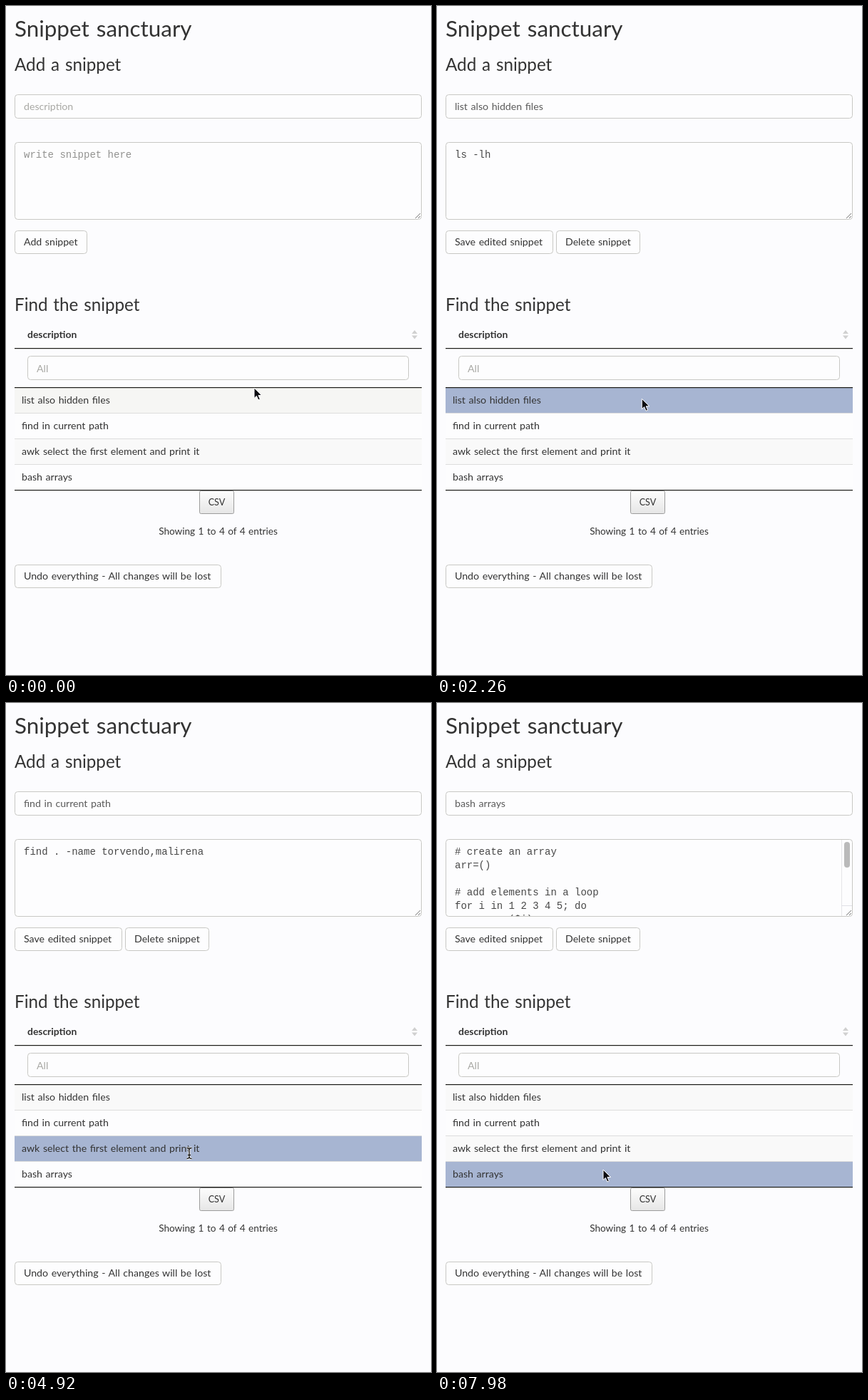
An HTML page for the animation above (8000 ms loop, 596 px wide and 939 px high).

```html
<!DOCTYPE html>
<html lang="en">
<head>
<meta charset="utf-8">
<title>Snippet sanctuary</title>
<style>
  html, body { margin: 0; width: 100%; height: 100%; overflow: hidden; background: #fcfcfe; }
  svg { display: block; }
  text { font: 14.15px Lato, sans-serif; word-spacing: .07em; fill: #333; white-space: pre; }
  .title { font-size: 31.4px; }
  .heading { font-size: 24.2px; }
  .strong { font-size: 13.9px; font-weight: bold; }
  .small { font-size: 12.6px; }
  .status { font-size: 13.6px; }
  .middle { text-anchor: middle; }
  .value { fill: #5a5a5a; }
  .hint { fill: #a8a8a4; }
  .code { font: 14px "Liberation Mono", monospace; word-spacing: 0; fill: #484848; }
  .code.hint { fill: #929290; }
  .box { fill: #fdfdfe; stroke: #c8c8c4; }
  .rule { fill: #1b1b18; }
</style>
</head>
<body>
<svg id="stage" width="596" height="939" viewBox="0 0 596 939">
  <defs>
    <linearGradient id="raised" x2="0" y2="1">
      <stop stop-color="#fdfdfd"/><stop offset="1" stop-color="#e6e6e6"/>
    </linearGradient>
    <clipPath id="editorClip"><rect x="13" y="192" width="569" height="107"/></clipPath>
    <path id="beamShape" d="M-3.5 -7.5Q0 -7.5 0 -5V5Q0 7.5 -3.5 7.5M3.5 -7.5Q0 -7.5 0 -5V5Q0 7.5 3.5 7.5M-2 2.5H2"/>
  </defs>
  <g id="page"></g>
  <g id="form"></g>
  <g id="table"></g>
  <g id="arrow">
    <path d="M0 0V14.5L3.4 11.4L5.8 17L8.3 15.9L5.9 10.5H10.5Z" fill="#0b0b10" stroke="#fff" stroke-linejoin="round"/>
  </g>
  <g id="beam" fill="none">
    <use href="#beamShape" stroke="#fff" stroke-width="3"/>
    <use href="#beamShape" stroke="#111" stroke-width="1.3"/>
  </g>
</svg>
<script>
const LOOP = 8000;
const ROW_TOP = 536, ROW_HEIGHT = 36;
const COLORS = { selected: "#a7b5d2", hovered: "#f6f6f4", striped: "#f9f9f9", plain: "#fdfdfe" };

const snippets = [
  { name: "list also hidden files", code: "ls -lh" },
  { name: "find in current path", code: "find . -name torvendo,malirena" },
  { name: "awk select the first element and print it", code: "ls | awk -F/ '{print $1}'" },
  { name: "bash arrays", code: "# create an array\narr=()\n\n# add elements in a loop\nfor i in 1 2 3 4 5; do\n    arr+=($i);" },
];

// A click highlights a row at once; the form follows a little later.
const clicks = [
  { select: 900, load: 1150 },
  { select: 3450, load: 3750 },
  { select: 4760, load: 5080 },
  { select: 6860, load: 7120 },
];

// Pointer stops: time, x, y
const pointerPath = [
  [0, 348, 536], [650, 288, 550], [2200, 288, 550], [2800, 262, 595],
  [3900, 262, 595], [4300, 257, 632], [5250, 257, 632], [5720, 233, 655],
];

const byId = id => document.getElementById(id);
const escapeText = s => s.replace(/&/g, "&amp;").replace(/</g, "&lt;");
const label = (x, y, s, cls = "") => `<text x="${x}" y="${y}" class="${cls}">${escapeText(s)}</text>`;
const box = (x, y, w, h) => `<rect class="box" x="${x + .5}" y="${y + .5}" width="${w - 1}" height="${h - 1}" rx="4"/>`;
const bar = (x, y, w, h, fill) => `<rect x="${x}" y="${y}" width="${w}" height="${h}" fill="${fill}"/>`;
const rule = y => `<rect class="rule" x="12" y="${y}" width="571" height="1.2"/>`;
const button = (x, y, w, s) => box(x, y, w, 33) + label(x + 13, y + 21, s);

function drawPage() {
  byId("page").innerHTML =
    label(12, 43, "Snippet sanctuary", "title") +
    label(12, 91, "Add a snippet", "heading") +
    label(12, 428, "Find the snippet", "heading") +
    label(30, 466, "description", "strong") +
    `<path d="M569 460L573 455L577 460ZM569 462.5L573 467.5L577 462.5Z" fill="#d0d0d0"/>` +
    rule(480) + box(30, 491, 535, 34) + label(43, 513.5, "All", "hint") +
    `<rect x="271.5" y="680.5" width="48" height="32" rx="2" fill="url(#raised)" stroke="#9c9c9c"/>` +
    label(295.5, 701, "CSV", "small middle") +
    label(297.5, 742, "Showing 1 to 4 of 4 entries", "status middle") +
    button(12, 784, 290, "Undo everything - All changes will be lost");
}

function drawForm(index) {
  const snippet = snippets[index];
  const lines = snippet ? snippet.code.split("\n") : ["write snippet here"];
  const scrollbar = lines.length > 5
    ? bar(567, 192, 1, 107, "#e6e6e8") + bar(567, 284, 15, 1, "#e0e0e6") +
      `<rect x="571" y="195" width="8" height="36" rx="4" fill="#bababa"/>`
    : "";
  byId("form").innerHTML =
    box(12, 124, 571, 34) +
    label(25, 145.5, snippet ? snippet.name : "description", snippet ? "value" : "hint") +
    box(12, 191, 571, 109) +
    `<g clip-path="url(#editorClip)">` +
    lines.map((line, i) => label(25, 212.5 + 19 * i, line, snippet ? "code" : "code hint")).join("") +
    scrollbar + `</g><path d="M574 298L581 291M578 298L581 295" stroke="#777"/>` +
    (snippet
      ? button(12, 315, 151, "Save edited snippet") + button(167, 315, 118, "Delete snippet")
      : button(12, 315, 102, "Add snippet"));
}

function drawTable(selected, hovered) {
  byId("table").innerHTML = snippets.map(({ name }, i) => {
    const y = ROW_TOP + ROW_HEIGHT * i;
    const look = i === selected ? "selected" : i === hovered ? "hovered" : i % 2 ? "plain" : "striped";
    return bar(12, y, 571, ROW_HEIGHT, COLORS[look]) +
      (i ? bar(12, y - 1, 571, 1, "#ddd") : "") + label(22, y + 22, name);
  }).join("") + rule(535) + rule(679);
}

function pointerAt(time) {
  const next = pointerPath.findIndex(stop => stop[0] > time);
  if (next < 0) return pointerPath.at(-1).slice(1);
  const [t0, x0, y0] = pointerPath[next - 1], [t1, x1, y1] = pointerPath[next];
  const u = (time - t0) / (t1 - t0), eased = u * u * (3 - 2 * u);
  return [x0 + (x1 - x0) * eased, y0 + (y1 - y0) * eased];
}

const lastIndex = (time, key) => clicks.filter(click => time >= click[key]).length - 1;

let formState, tableState;
function render(now) {
  const time = now % LOOP;
  const [x, y] = pointerAt(time);
  const hovered = Math.floor((y - ROW_TOP) / ROW_HEIGHT);
  const selected = lastIndex(time, "select"), loaded = lastIndex(time, "load");

  if (formState !== loaded) drawForm(formState = loaded);
  const nextTable = `${selected}/${hovered}`;
  if (tableState !== nextTable) {
    drawTable(selected, hovered);
    tableState = nextTable;
  }

  const overText = hovered === 2 && x < 271 && Math.abs(y - 625) < 9;
  for (const [id, shown] of [["arrow", !overText], ["beam", overText]]) {
    byId(id).setAttribute("transform", `translate(${x} ${y})`);
    byId(id).setAttribute("visibility", shown ? "visible" : "hidden");
  }
  requestAnimationFrame(render);
}

drawPage();
render(0);
</script>
</body>
</html>
```
